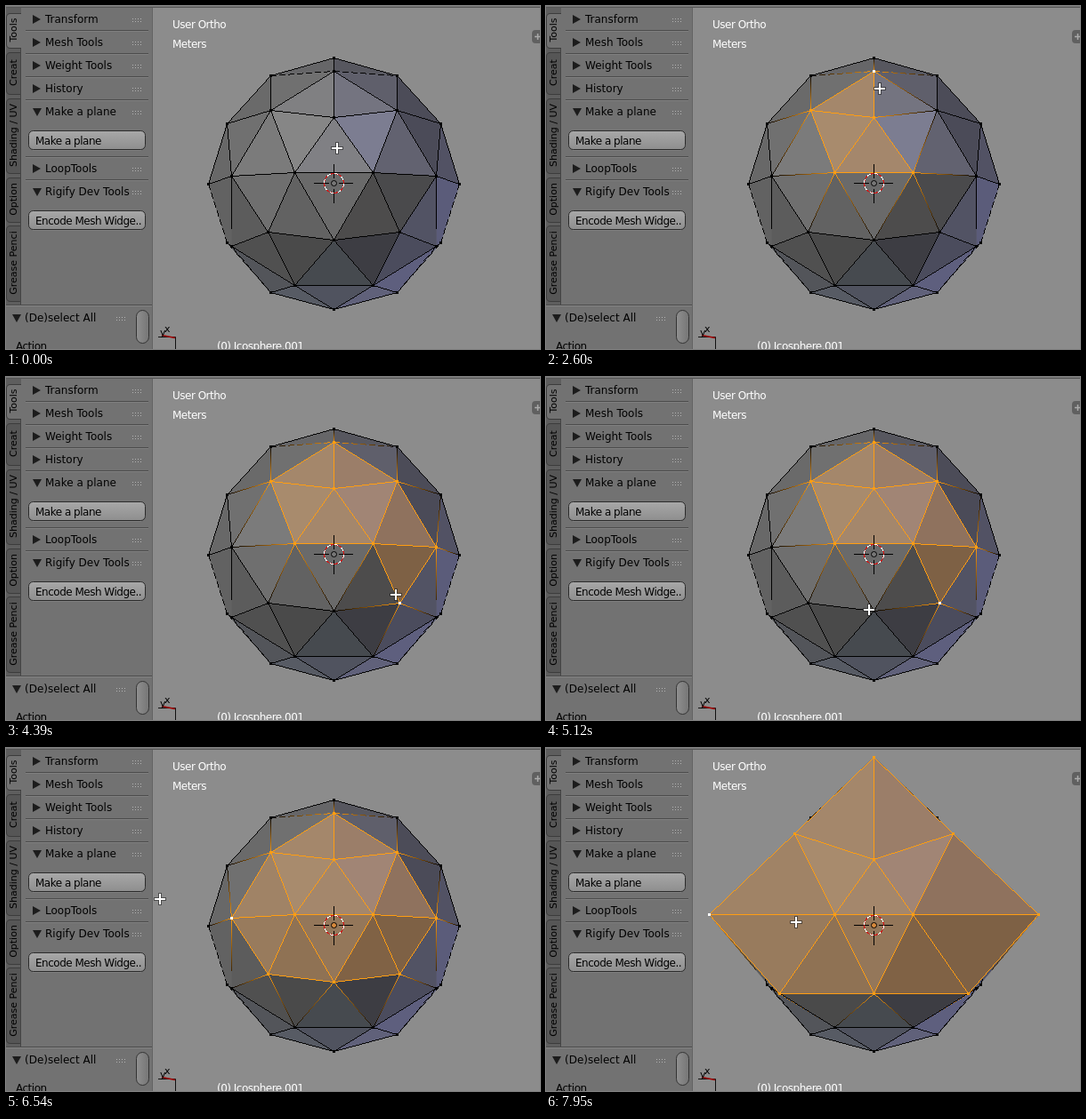
Recreate the animation shown at these times as an HTML page with a canvas. Size 600 by 386 pixels, loop 8 s.

```html
<!DOCTYPE html>
<html lang="en">
<head>
<meta charset="utf-8">
<title>Selecting faces on a sphere</title>
<style>
html, body { margin: 0; width: 100%; height: 100%; overflow: hidden; background: #8c8c8c; }
canvas, svg { position: absolute; left: 0; top: 0; }
text { font-family: "DejaVu Sans", sans-serif; font-size: 12px; white-space: pre; }
.tight { letter-spacing: -.5px; }
.tab { font-size: 11px; }
</style>
</head>
<body>
<canvas id="view" width="600" height="386"></canvas>
<svg id="ui" width="600" height="386" viewBox="0 0 600 386">
  <defs>
    <linearGradient id="normal" x2="0" y2="1"><stop stop-color="#a8a8a8"/><stop offset="1" stop-color="#8e8e8e"/></linearGradient>
    <linearGradient id="hover" x2="0" y2="1"><stop stop-color="#b8b8b8"/><stop offset="1" stop-color="#9e9e9e"/></linearGradient>
    <linearGradient id="pressed" x2="0" y2="1"><stop stop-color="#484848"/><stop offset="1" stop-color="#636363"/></linearGradient>
    <linearGradient id="thumb"><stop stop-color="#909090"/><stop offset="1" stop-color="#757575"/></linearGradient>
  </defs>
  <g id="static"></g>
  <g id="cross">
    <path d="M-7 0H7M0-7V7" stroke="#222" stroke-width="4" stroke-opacity=".6"/>
    <path d="M-6 0H6M0-6V6" stroke="#fff" stroke-width="2"/>
  </g>
  <path id="arrow" d="M0 0V25L5.500 20L10 30L14 28L9.500 18.500H17Z" fill="#fff" stroke="#222" stroke-width="1"/>
</svg>
<script>
const LOOP = 8000, STEP = 78.7, CX = 368;
const PLANE_AT = 7330, PRESS_AT = 7160, LEAVE_AT = 7710;
const BLACK = [0, 0, 0], ORANGE = [255, 157, 18], TINT = [247, 150, 52];

// Capital letters are the middle and left points; small letters mirror them.
const POINTS = {
  A: [368, 58], D: [368, 73], I: [368, 125], R: [368, 263], Y: [368, 341],
  B: [297, 78], E: [297, 117], G: [248, 132], J: [324, 187], L: [253, 191],
  N: [227, 200], P: [294, 254], S: [253, 270], Z: [248, 266], U: [324, 314], W: [297, 322]
};
const FLAT = { D: [368, 10], E: [279, 96], L: [183, 187], P: [262, 276], R: [368, 276] };
const FACES = [
  'ABD 666668 57575f', 'BDE 707070 5f5f6b', 'BEG 6a6a6a 4c4c58', 'DEI 808082 747480',
  'EIJ 868686 7c7d91', 'EGL 707070 4b4b58', 'EJL 7b7b7b 626270', 'GLN 686868 525264',
  'LNZS 626262 5b5c7a', 'LJP 6f6f6f 4a4a4c', 'LPS 5c5c5c 525364', 'JPR 626262 4d4c4c',
  'PRU 4a4a4a 3d3d43', 'PSU 505050 4b4c5d', 'SZW 55575a 5d5e7c', 'SUW 53555a 5e5f7e',
  'UWY 575b64 60617a', 'IJj 808084', 'JjR 6a6a6a', 'RUu 464a4f', 'UuY 50535f'
];
const DASHED = ['BD', 'NZ', 'WZ', 'SW'];
const SELECT = [[470, 'I'], [940, 'j'], [1650, 'J'], [2035, 'E'], [2505, 'D'], [3055, 'e'],
  [3800, 'l'], [4385, 'p'], [5175, 'R'], [5590, 'P'], [5985, 'L']];
const POINTER = [
  [0, 372, 160], [150, 384, 147], [300, 374, 125], [555, 374, 125], [775, 404, 180], [1020, 404, 180],
  [1480, 320, 187], [1640, 320, 187], [1885, 303, 137], [1960, 299, 130], [2110, 299, 130],
  [2430, 370, 76], [2510, 370, 76], [2585, 375, 93], [2665, 375, 93], [2980, 436, 124], [3130, 436, 124],
  [3760, 476, 189], [3960, 476, 189], [4155, 440, 245], [4385, 440, 245], [5020, 363, 262], [5190, 363, 262],
  [5510, 300, 250], [5600, 298, 248], [5890, 261, 192], [6225, 261, 192], [6765, 102, 153],
  [7630, 102, 153], [7860, 308, 197], [7940, 281, 196], [8000, 281, 196]
];

const byId = id => document.getElementById(id);
const mix = (a, b, k) => a.map((v, i) => v + (b[i] - v) * k);
const rgb = c => `rgb(${c.map(Math.round)})`;
const hex = s => [0, 2, 4].map(i => parseInt(s.slice(i, i + 2), 16));
const mirrorPoint = n => POINTS[n.toUpperCase()][0] === CX ? n : n.toLowerCase();
const mirror = names => [...names].map(mirrorPoint).join('');

const faces = FACES.flatMap(row => {
  const [pts, left, right] = row.split(' ');
  const list = [{ pts, color: hex(left) }];
  if (right) list.push({ pts: mirror(pts), color: hex(right) });
  return list;
});
const edges = [...new Set(faces.flatMap(f =>
  [...f.pts].map((p, i) => [p, f.pts[(i + 1) % f.pts.length]].sort().join(''))))];
const corners = [...new Set(faces.flatMap(f => [...f.pts]))];
const isPair = (edge, pair) => [...edge.toUpperCase()].sort().join('') === pair;

const ctx = byId('view').getContext('2d');
let drawn = '';

function place(name, flat) {
  const key = name.toUpperCase();
  const [x, y] = flat && FLAT[key] || POINTS[key];
  return [name === key ? x : 2 * CX - x, y];
}

// Hard one-pixel line whose colour blends from end to end.
function pixelLine(a, b, from, to, dashed, reach) {
  const n = Math.max(Math.abs(b[0] - a[0]), Math.abs(b[1] - a[1]));
  for (let i = 0; i <= n * reach; i++) {
    if (dashed && i % 10 > 6) continue;
    const [x, y] = mix(a, b, i / n);
    ctx.fillStyle = rgb(mix(from, to, i / n));
    ctx.fillRect(Math.round(x), Math.round(y), 1, 1);
  }
}

function drawMesh(t) {
  const flat = t >= PLANE_AT;
  const order = SELECT.filter(s => t >= s[0]).map(s => s[1]);
  const state = order.join('') + flat;
  if (state === drawn) return;
  drawn = state;
  const picked = new Set(order), active = order[order.length - 1];
  const full = names => [...names].every(n => picked.has(n));
  const ink = n => picked.has(n) ? ORANGE : BLACK;

  const fillFace = f => {
    ctx.beginPath();
    for (const p of f.pts) {
      const [x, y] = place(p, flat);
      ctx.lineTo(x + .5, y + .5);
    }
    ctx.closePath();
    ctx.fillStyle = ctx.strokeStyle = rgb(full(f.pts) ? mix(f.color, TINT, .3) : f.color);
    ctx.lineWidth = .5;
    ctx.fill();
    ctx.stroke();
  };

  const drawEdge = e => pixelLine(place(e[0], flat), place(e[1], flat), ink(e[0]), ink(e[1]),
    DASHED.some(d => isPair(e, d)), isPair(e, 'LS') ? .75 : 1);

  const drawDot = n => {
    const [x, y] = place(n, flat);
    ctx.fillStyle = n === active ? '#fff' : rgb(ink(n));
    ctx.fillRect(x - 1, y - 1, 3, 3);
  };

  ctx.fillStyle = '#8c8c8c';
  ctx.fillRect(0, 0, 600, 386);
  for (const on of [false, true]) {
    faces.filter(f => full(f.pts) === on).forEach(fillFace);
    edges.filter(e => full(e) === on).forEach(drawEdge);
    corners.filter(n => picked.has(n) === on).forEach(drawDot);
  }
  byId('origin').setAttribute('fill', picked.has('R') ? '#d98a3c' : '#777');
}

function pointerAt(t) {
  const q = Math.max(0, 70 + STEP * Math.floor((t - 60) / STEP));
  const i = Math.max(1, POINTER.findIndex(p => p[0] > q));
  const a = POINTER[i - 1], b = POINTER[i];
  return mix(a, b, (q - a[0]) / (b[0] - a[0])).slice(1).map(Math.round);
}

function buildUi() {
  let out = '';
  const rect = (x, y, w, h, fill, more = '') => out += `<rect x="${x}" y="${y}" width="${w}" height="${h}" fill="${fill}" ${more}/>`;
  const path = (d, more) => out += `<path d="${d}" ${more}/>`;
  const text = (x, y, s, kind = '', fill = '#000', more = '') => out += `<text x="${x}" y="${y}" class="${kind}" fill="${fill}" ${more}>${s}</text>`;
  const grip = (x, y) => {
    for (let i = 0; i < 8; i++) rect(x + i % 4 * 3, y + (i > 3) * 3, 1, 1, '#b2b2b2');
  };
  const header = (x, y, label, open, gripX) => {
    path(open ? `M${x} ${y - 4}h10l-5 9z` : `M${x} ${y - 5}v10l9-5z`, 'fill="#1c1c1c"');
    text(x + 14, y + 4, label);
    grip(gripX, y - 1);
  };
  const button = (y, label, id) => {
    rect(25.5, y - .5, 131, 21, 'url(#normal)', `id="${id}" rx="5" stroke="#2b2b2b"`);
    path(`M30 ${y + 21.5}H152`, 'stroke="#7f7f7f"');
    text(33, y + 15, label, 'tight', '#000', `id="${id}Label"`);
  };

  // Tool shelf
  rect(0, 0, 165, 386, '#727272');
  rect(0, 0, 17, 336, '#5e5e5e');
  [['Tools', 8, 48], ['Creat', 52, 100], ['Shading / UV', 104, 189], ['Option', 193, 244], ['Grease Penci', 247, 333]].forEach(([s, top, end], i) => {
    path(`M17 ${top + .5}H5Q.5 ${top + .5} .5 ${top + 5}V${end - 5}Q.5 ${end - .5} 5 ${end - .5}H17`,
      `fill="${i ? '#565656' : '#727272'}" stroke="#3c3c3c"`);
    text(0, 0, s, 'tab', '#000', `text-anchor="middle" transform="translate(12 ${(top + end) / 2 - 1}) rotate(-90)"`);
  });
  rect(16, 48, 1, 288, '#444');
  for (const y of [27, 53, 79, 105, 169, 195]) {
    rect(22, y, 138, 1, '#4c4c4c');
    rect(22, y + 1, 138, 1, '#808080');
  }
  [['Transform', 15], ['Mesh Tools', 41], ['Weight Tools', 67], ['History', 93], ['Make a plane', 119, 1], ['LoopTools', 183], ['Rigify Dev Tools', 209, 1]]
    .forEach(([s, y, open]) => header(30, y, s, open, 142));
  button(141, 'Make a plane', 'make');
  button(231, 'Encode Mesh Widge..', 'encode');
  rect(0, 336, 165, 1, '#4a4a4a');
  rect(0, 337, 165, 1, '#858585');
  header(7, 351, '(De)select All', 1, 124);
  text(11, 387, 'Action', 'tight');
  rect(146.5, 342.5, 14, 37, 'url(#thumb)', 'rx="7" stroke="#333"');
  rect(164, 0, 1, 386, '#636363');
  rect(0, 0, 600, 1, '#777');
  rect(0, 1, 600, 1, '#555');

  // Viewport labels and gizmos
  text(187, 25, 'User Ortho', 'tight', '#fff');
  text(187, 47, 'Meters', 'tight', '#fff');
  text(237, 387, '(0) Icosphere.001', 'tight', '#fff');
  rect(591, 27, 14, 15, '#606060', 'rx="4"');
  path('M594 34.500h6M597.500 31v7', 'stroke="#aaa" stroke-width="1.500"');
  path('M171 372.500H190.500V386', 'fill="none" stroke="#111"');
  path('M175 370.500L190 373.500', 'stroke="#a00000" stroke-width="1.500"');
  text(173, 371, 'y', 'tab');
  text(178, 367, 'x', 'tab');
  path('M346 199.500h17M374 199.500h16M368.500 178v16M368.500 206v16', 'stroke="#000"');
  out += '<g fill="none" shape-rendering="crispEdges"><circle cx="368.500" cy="199.500" r="11" stroke="#d01818"/>' +
    '<circle cx="368.500" cy="199.500" r="11" stroke="#fff" stroke-dasharray="4.320"/></g>' +
    '<circle id="origin" cx="368.500" cy="199.500" r="3" stroke="#000"/>';
  byId('static').innerHTML = out;
}

function render(now) {
  const t = now % LOOP;
  drawMesh(t);
  const state = t < PRESS_AT || t >= LEAVE_AT ? 'normal' : t < PLANE_AT ? 'pressed' : 'hover';
  byId('make').setAttribute('fill', `url(#${state})`);
  byId('makeLabel').setAttribute('fill', state === 'pressed' ? '#fff' : '#000');
  const [x, y] = pointerAt(t), over = x < 165;
  for (const id of ['cross', 'arrow']) {
    byId(id).setAttribute('transform', `translate(${x} ${y})`);
    byId(id).setAttribute('visibility', (id === 'arrow') === over ? 'visible' : 'hidden');
  }
}

buildUi();
const start = performance.now();
(function tick() {
  render(performance.now() - start);
  requestAnimationFrame(tick);
})();
</script>
</body>
</html>
```
